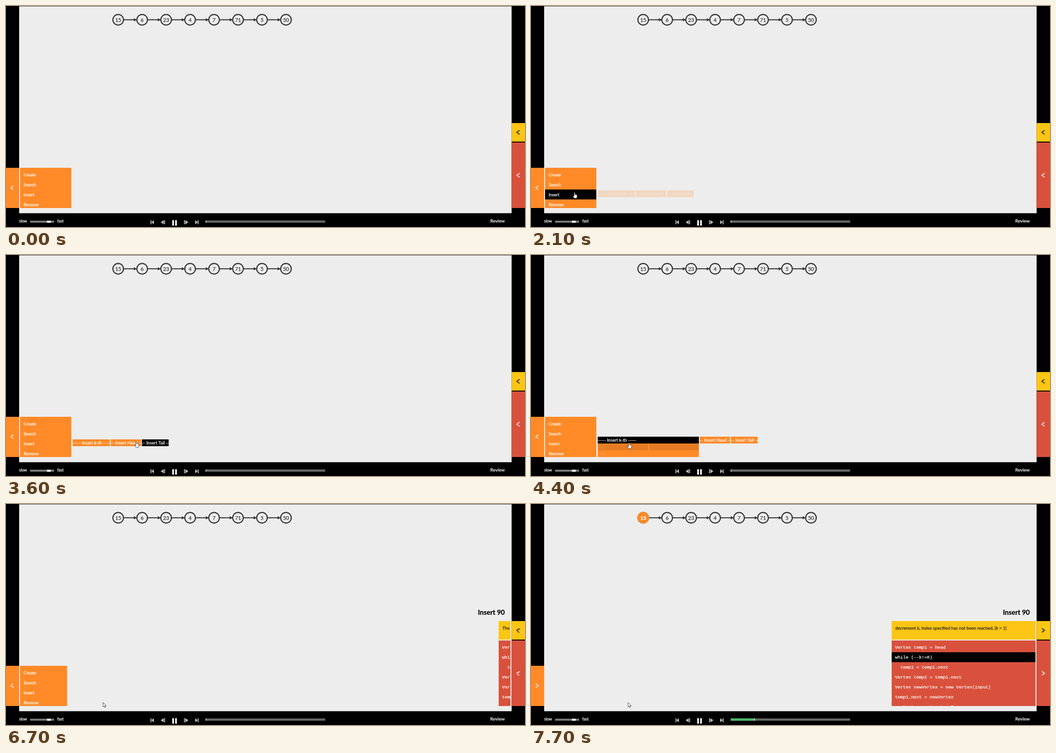
Write an HTML page with a canvas that moves like this. It is 1144 px wide and 489 px high and loops after 8 s.

```html
<!DOCTYPE html>
<html>
<head>
<meta charset="utf-8">
<style>
  html, body { margin: 0; width: 100%; height: 100%; overflow: hidden; background: #000; }
  canvas { display: block; }
</style>
</head>
<body>
<canvas id="stage" width="1144" height="489"></canvas>
<script>
const ctx = document.getElementById('stage').getContext('2d');
const SANS = 'Lato, "Open Sans", sans-serif';
const MONO = '"Liberation Mono", monospace';
const ORANGE = '#ff8a27', YELLOW = '#fdc514', RED = '#d9513c', LIGHT = '#ededed', DARK = '#333';
const LOOP = 8000, STEP = 100;
const FADE_IN = 2100, EXPAND = 4400, RUN = 6700, ADVANCE = 7400;

const MENU = ['Create', 'Search', 'Insert', 'Remove'];
const LIST = [15, 6, 23, 4, 7, 71, 5, 50];
const CODE = ['Vertex temp1 = head', 'while (--k!=0)', '  temp1 = temp1.next',
  'Vertex temp2 = temp1.next', 'Vertex newVertex = new Vertex(input)',
  'temp1.next = newVertex', 'newVertex.next = temp2'];
const INSERTS = ['----- Insert k-th -----', '-- Insert Head --', '-- Insert Tail --'];

// pointer moves: start, duration, destination x and y
const MOVES = [[300, 100, 87, 193], [500, 500, 95, 440], [1100, 300, 96, 412], [2100, 700, 262, 411],
  [2900, 200, 320, 411], [3500, 500, 216, 415], [4900, 300, 215, 422], [5200, 300, 214, 439]];
const ARROW = new Path2D('M0 0V10L2.3 8L4 11.5L5.3 10.8L3.8 7.5H7Z');
const HAND = new Path2D('M-1 9V1Q0-1 1 1V5L5 6L6 8L4.5 13.6H-.5L-4 8.5Z');

const clamp = v => Math.min(1, Math.max(0, v));
const ease = p => .5 - Math.cos(Math.PI * clamp(p)) / 2;
const glide = p => 1 - (1 - clamp(p)) ** 1.7;
const inside = (p, x, y, w, h) => p && p[0] >= x && p[0] < x + w && p[1] >= y && p[1] < y + h;

function box(x, y, w, h, color) {
  ctx.fillStyle = color;
  ctx.fillRect(x, y, w, h);
}

function text(s, x, y, size, color = '#fff', align = 'left', weight = 400, family = SANS) {
  ctx.font = `${weight} ${size}px ${family}`;
  ctx.textAlign = align;
  ctx.fillStyle = ctx.strokeStyle = color;
  ctx.lineWidth = .25;
  ctx.fillText(s, x, y);
  ctx.strokeText(s, x, y);
}

// triangle with its base at x, pointing right for a positive length
function triangle(x, y, length, half, color) {
  ctx.beginPath();
  ctx.moveTo(x, y - half);
  ctx.lineTo(x + length, y);
  ctx.lineTo(x, y + half);
  ctx.fillStyle = color;
  ctx.fill();
}

function scoped(draw) {
  ctx.save();
  draw();
  ctx.restore();
}

function clipped(x, y, w, h, draw) {
  scoped(() => {
    ctx.beginPath();
    ctx.rect(x, y, w, h);
    ctx.clip();
    draw();
  });
}

function faded(alpha, draw) {
  scoped(() => {
    ctx.globalAlpha = clamp(alpha);
    draw();
  });
}

function pointer(t) {
  if (t < MOVES[0][0]) return null;
  let x = 27, y = 48;
  for (const [start, span, toX, toY] of MOVES) {
    const p = glide((t - start) / span);
    x += (toX - x) * p;
    y += (toY - y) * p;
  }
  return [x, y];
}

function cursor([x, y], shape) {
  scoped(() => {
    ctx.translate(x, y);
    ctx.fillStyle = '#fff';
    ctx.strokeStyle = DARK;
    ctx.lineWidth = .9;
    ctx.fill(shape);
    ctx.stroke(shape);
  });
}

function chevron(x, y, turn, color) {
  scoped(() => {
    ctx.translate(x, y);
    ctx.rotate(turn * Math.PI);
    ctx.beginPath();
    ctx.moveTo(3, -4.5);
    ctx.lineTo(-3, 0);
    ctx.lineTo(3, 4.5);
    ctx.strokeStyle = color;
    ctx.lineWidth = 1.8;
    ctx.stroke();
  });
}

function node(x, label, fill, line, color, weight) {
  ctx.beginPath();
  ctx.arc(x, 30.5, 11.7, 0, 7);
  ctx.fillStyle = fill;
  ctx.fill();
  ctx.strokeStyle = line;
  ctx.lineWidth = 2.4;
  ctx.stroke();
  text(label, x, 34.5, 11.5, color, 'center', weight);
}

function list(glow) {
  LIST.forEach((label, i) => {
    const x = 247.3 + i * 52.83;
    if (i < LIST.length - 1) {
      box(x + 12, 29.4, 25, 2.2, DARK);
      triangle(x + 34.5, 30.5, 7, 3.6, DARK);
    }
    node(x, label, LIGHT, DARK, DARK, 400);
  });
  if (glow) faded(glow, () => node(247.3, LIST[0], ORANGE, ORANGE, '#fff', 700));
}

function controls(progress) {
  const gray = '#bbb', top = 474, mid = 371.5, done = 52 * progress;
  text('slow', 29, 479, 8.6);
  text('fast', 113, 479, 8.6);
  box(53, 475, 53, 4.5, '#777');
  box(90.5, 475, 8, 4.5, '#fff');
  for (const dir of [-1, 1]) {
    box(mid + 3.25 * dir - 1.75, top, 3.5, 12, '#fff');
    box(mid + 22 * dir - 1, top, 2, 9, gray);
    triangle(mid + 24 * dir, top + 4.5, 6.5 * dir, 4.5, gray);
    triangle(mid + 45.5 * dir, top + 4.5, 5.5 * dir, 4.5, gray);
    box(mid + 52 * dir - 1, top, 2, 9, gray);
  }
  box(440, 474.5, 263.5, 5, '#666');
  box(440, 474.5, done, 5, '#4cb86a');
  box(440 + done, 474.5, 1.2, 5, '#fff');
  text('Review', 1099.5, 478.5, 10.2, '#fff', 'right');
}

function menu(open, hover) {
  clipped(31, 358, 113 * open, 89, () => {
    box(31, 358, 113, 89, ORANGE);
    MENU.forEach((label, i) => {
      const y = 362 + i * 22;
      if (inside(hover, 31, y, 113, 22)) box(31, y, 113, 22, '#000');
      text(label, 39, y + 14.5, 9.4);
    });
  });
}

function inserts(t, hover) {
  const wide = t >= EXPAND, y = wide ? 402 : 408;
  let x = 147;
  faded(.22 + (t - FADE_IN) / 330, () => {
    [wide ? 223 : 82, 66.5, 59].forEach((w, i) => {
      box(x, y, w, 15, inside(hover, x, y, w, 15) ? '#000' : ORANGE);
      clipped(x, y, w, 15, () => text(INSERTS[i], x, y + 11, 9.7));
      x += w + 2;
    });
  });
  if (!wide) return;
  box(147, 417, 223, 30, ORANGE);
  faded(.1 + (t - EXPAND) / 500, () => {
    box(149, 417, 109, 15, '#000');
    box(261, 417, 109, 15, '#000');
    if (inside(hover, 149, 432, 221, 15)) box(149, 432, 221, 15, '#000');
    text('90', 150.5, 428.5, 9.6);
    text('2', 262, 428.5, 9.6);
    text('GO', 149, 443, 9.2);
  });
}

function panels(open, advanced) {
  const w = 317 * open, x = 1112 - w;
  const status = advanced
    ? 'decrement k, index specified has not been reached, (k = 1)'
    : 'The current Linked List';
  text('Insert 90', 1099.5, 245, 14.9, '#000', 'right', 700);
  clipped(x, 259, w, 188, () => {
    box(x, 259, w, 41, YELLOW);
    text(status, x + 8, 277.5, 9.7, '#222');
    box(x, 302, w, 145, RED);
    if (advanced) box(x, 328, w, 22, '#000');
    CODE.forEach((line, i) => text(line, x + 7.5, 319.7 + i * 22, 9.77, '#fff', 'left', 400, MONO));
  });
}

function draw(now) {
  const t = Math.floor(now % LOOP / STEP) * STEP;
  const run = t >= RUN, advanced = t >= ADVANCE;
  const turn = run ? ease((t - RUN + 74) / 400) : 0;
  const step = advanced ? ease((t - ADVANCE + 60) / 360) : 0;
  const tip = pointer(t);
  const hover = run ? null : pointer(t - STEP);

  box(0, 0, 1144, 489, '#000');
  box(29, .7, 1085.5, 457.8, LIGHT);
  list(step);
  controls(step);

  box(0, 358, 29, 89, ORANGE);
  box(1114.5, 259, 29.5, 41, YELLOW);
  box(1114.5, 302, 29.5, 145, RED);
  chevron(13.5, 402, -turn, '#ffe9d6');
  chevron(1129, 279.5, turn, '#222');
  chevron(1129, 374.5, turn, '#fbe6e2');

  menu(1 - turn, hover);
  if (t >= FADE_IN && !run) inserts(t, hover);
  if (run) panels(turn, advanced);

  const hand = !run && (t >= FADE_IN || inside(tip, 31, 358, 113, 89));
  if (tip) cursor(tip, hand ? HAND : ARROW);
}

const start = performance.now();
function tick() {
  draw(performance.now() - start);
  requestAnimationFrame(tick);
}
tick();
</script>
</body>
</html>
```
